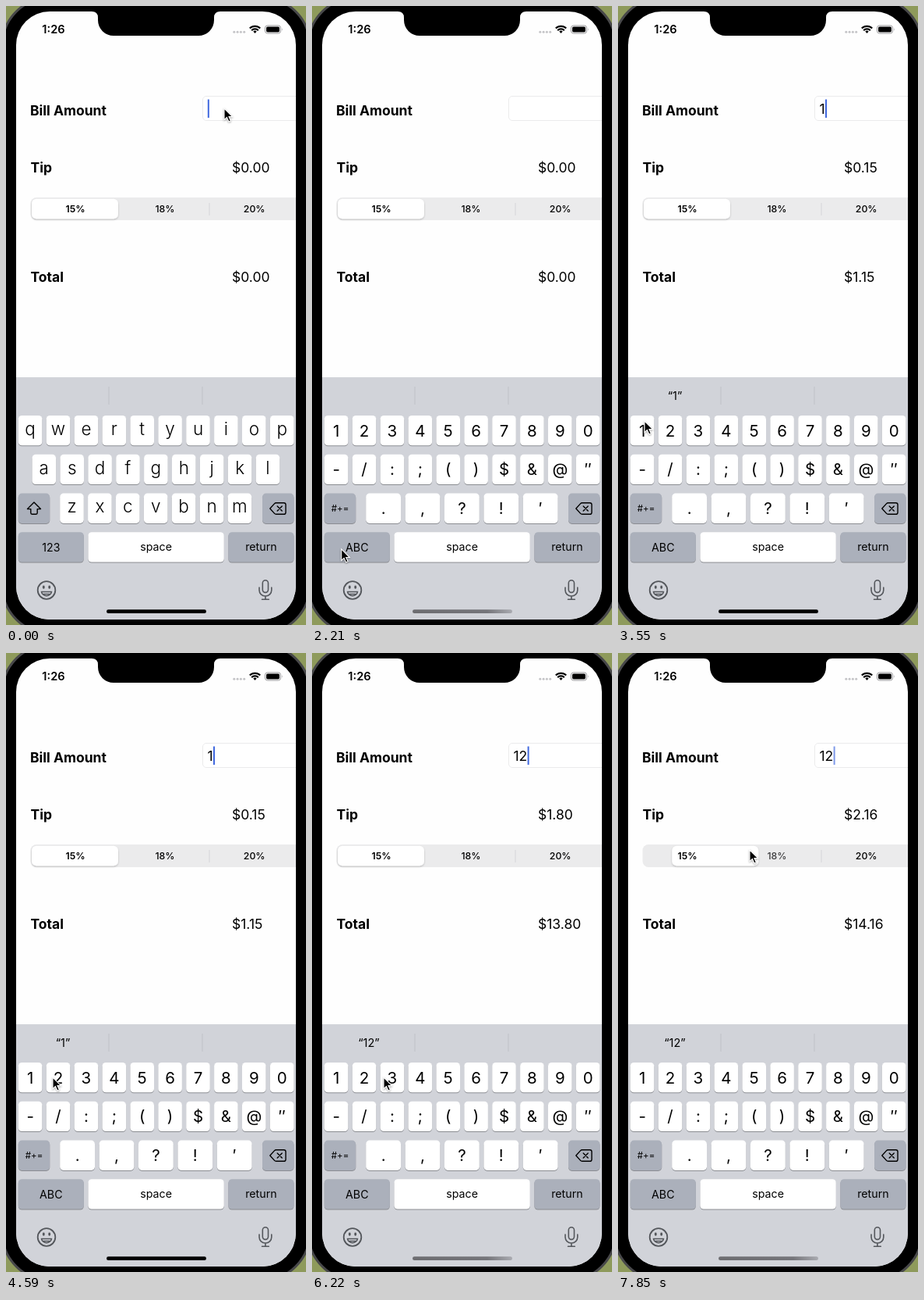
An HTML page for the animation above (8000 ms loop, 385 by 792 pixels).

```html
<!DOCTYPE html>
<html lang="en">
<head>
<meta charset="utf-8">
<title>Tip calculator</title>
<style>
  html, body { margin: 0; width: 100%; height: 100%; overflow: hidden; background: #8e9a5b; }
  svg { display: block; width: 385px; height: 792px; }
  text { font-family: Inter, Roboto, sans-serif; white-space: pre; }
  .label { font-size: 17.5px; font-weight: 700; }
  .value { font-size: 17.5px; }
  .mid { text-anchor: middle; }
  .seg { font-size: 12.3px; font-weight: 500; }
  .letter { font-size: 22.5px; font-weight: 350; }
  .digit { font-size: 20.5px; }
  .word { font-size: 14.2px; }
  .small { font-size: 11.5px; }
  .hint { font-size: 14.5px; }
  .big { font-size: 32px; }
  .line { fill: none; stroke-linecap: round; stroke-linejoin: round; }
</style>
</head>
<body>
<svg viewBox="0 0 385 792">
  <defs>
    <clipPath id="screen"><rect x="13" y="7" width="359" height="778" rx="43"/></clipPath>
    <linearGradient id="barFade">
      <stop offset="0" stop-color="#6d6d71"/>
      <stop offset=".75" stop-color="#75757a"/>
      <stop offset="1" stop-color="#a9aab0"/>
    </linearGradient>
    <filter id="soft" x="-20%" y="-20%" width="140%" height="160%">
      <feDropShadow dx="0" dy="1.2" stdDeviation="1.3" flood-opacity=".22"/>
    </filter>
  </defs>

  <rect width="385" height="792" fill="#8e9a5b"/>
  <rect x="-5" y="-11" width="395" height="814" rx="62" stroke="#48484a" stroke-width="3"/>
  <g clip-path="url(#screen)">
    <rect x="13" y="7" width="359" height="778" fill="#fefefe"/>

    <text class="label" x="31" y="139.5">Bill Amount</text>
    <text class="label" x="31.5" y="213.3">Tip</text>
    <text class="label" x="31.5" y="353.3">Total</text>
    <text class="value" id="tip" x="290" y="213.3"></text>
    <text class="value" id="total" x="290" y="353.3"></text>

    <rect x="252.5" y="115.5" width="140" height="31" rx="4.5" fill="#fff" stroke="#ebebec"/>
    <text class="value" id="amount" x="258.5" y="138"></text>
    <rect id="caret" y="119.5" width="2" height="23.5" fill="#4169df"/>

    <rect x="31.5" y="245" width="380" height="29" rx="7.5" fill="#ebebec"/>
    <rect x="260.5" y="252" width="1" height="16" fill="#d5d5d8"/>
    <rect id="thumb" y="246.7" width="111" height="25.6" rx="6" fill="#fff" filter="url(#soft)"/>
    <text class="seg mid" x="89" y="264" style="font-weight:600">15%</text>
    <text class="seg mid" id="second" x="204" y="264">18%</text>
    <text class="seg mid" x="318.7" y="264">20%</text>

    <rect x="13" y="475" width="359" height="310" fill="#d1d3d9"/>
    <path d="M132 487V510M252 487V510" stroke="#bfc1c7"/>
    <text class="hint mid" id="hint" x="73" y="504"></text>
    <g id="common"></g>
    <g id="letters"></g>
    <g id="digits"></g>

    <g class="line" stroke="#54575c" stroke-width="1.8">
      <circle cx="52" cy="747.5" r="11.3"/>
      <path d="M45.5 749.5H58.5A6.6 6.3 0 0 1 45.5 749.5ZM47 752.5H57" stroke-width="1.5"/>
      <path d="M48.3 743V744.3M55.7 743V744.3" stroke-width="2.8"/>
      <rect x="329.3" y="734.8" width="7.2" height="15.6" rx="3.6" stroke-width="1.6"/>
      <path d="M325 744V747.5A7.9 7.5 0 0 0 340.8 747.5V744M332.9 755V759.2M328.5 759.2H337.3" stroke-width="1.6"/>
    </g>
    <rect id="bar" x="129" y="772.3" width="128" height="4.8" rx="2.4"/>
    <g id="popup" filter="url(#soft)"><path fill="#fff"/><text class="big mid" y="505"></text></g>
  </g>

  <path d="M110 6H275V7Q267 7 267 15V18A20 20 0 0 1 247 38H138A20 20 0 0 1 118 18V15Q118 7 110 7Z"/>
  <text class="mid" x="61" y="35" font-size="14.6" font-weight="600">1:26</text>
  <g fill="#c4c4c7">
    <circle cx="292.8" cy="33.3" r="1.5"/><circle cx="297.1" cy="33.3" r="1.5"/>
    <circle cx="301.4" cy="33.3" r="1.5"/><circle cx="305.7" cy="33.3" r="1.5"/>
  </g>
  <g class="line" stroke="#000" stroke-width="2.2" style="stroke-linecap:butt">
    <path d="M312.8 28.6A9.4 9.4 0 0 1 326.2 28.6M315.2 31.2A6 6 0 0 1 323.8 31.2"/>
    <path d="M317.3 32.6A3 3 0 0 1 321.7 32.6L319.5 35Z" fill="#000" stroke="none"/>
  </g>
  <rect x="332.5" y="25" width="20" height="10" rx="3" fill="none" stroke="#98989b"/>
  <rect x="334" y="26.5" width="17" height="7" rx="1.7"/>
  <path d="M354 28.3Q355.4 30 354 31.7Z" fill="#98989b"/>

  <path id="cursor" d="M0 0V14.6L3.4 11.5L5.9 17L8.4 15.9L6 10.6H10.6Z" stroke="#fff" stroke-width="1.1"
        style="filter:drop-shadow(0 1px 1px rgba(0,0,0,.35))"/>
</svg>
<script>
const $ = id => document.getElementById(id);
const WHITE = '#fff', GRAY = '#abb0bb', PITCH = 35.9, KEY_W = 30.6, KEY_H = 38.3;
const ROWS = [524, 573.8, 623.6, 673.2];

function key(x, row, w, fill = WHITE, label = '', cls = 'word', drop = 23.6) {
  const y = ROWS[row], box = `x="${x}" width="${w}" height="${KEY_H}" rx="4.6"`;
  return `<rect ${box} y="${y + 1}" fill="#8b8d92"/><rect ${box} y="${y}" fill="${fill}"/>` +
    `<text class="${cls} mid" x="${x + w / 2}" y="${y + drop}">${label}</text>`;
}

const keyRow = (chars, x, row, cls, drop, pitch = PITCH, w = KEY_W) => [...chars]
  .map((c, i) => key(x + i * pitch, row, w, WHITE, c === '&' ? '&amp;' : c, cls, drop)).join('');

$('common').innerHTML =
  key(329, 2, 40.4, GRAY) + key(105.4, 3, 174.4, WHITE, 'space') + key(285.4, 3, 84, GRAY, 'return') +
  `<g class="line" stroke="#000" stroke-width="1.4">
    <path d="M338.8 643L344.6 636.6Q345.4 635.7 346.6 635.7H356.6Q359 635.7 359 638.1V647.9Q359 650.3 356.6 650.3H346.6Q345.4 650.3 344.6 649.4Z"/>
    <path d="M348.2 640L354.2 646M354.2 640L348.2 646"/></g>`;

$('letters').innerHTML =
  keyRow('qwertyuiop', 15.8, 0, 'letter', 24.8) + keyRow('asdfghjkl', 33.5, 1, 'letter', 24.8) +
  keyRow('zxcvbnm', 69.2, 2, 'letter', 24.8) + key(15.8, 2, 40.4, GRAY) +
  key(15.8, 3, 84, GRAY, '123', 'word', 24.4) +
  '<path class="line" d="M36 635L27.5 643.6H31.8V648.6Q31.8 650.2 33.4 650.2H38.6Q40.2 650.2 40.2 648.6V643.6H44.5Z" stroke="#000" stroke-width="1.4"/>';

$('digits').innerHTML =
  keyRow('1234567890', 15.8, 0, 'digit', 27) + keyRow('-/:;()$&@″', 15.8, 1, 'digit', 26.5) +
  keyRow('.,?!′', 69.2, 2, 'digit', 26.5, 50.4, 44.8) +
  key(15.8, 2, 40.4, GRAY, '#+=', 'small', 23.6) + key(15.8, 3, 84, GRAY, 'ABC', 'word', 25.2);

const LOOP = 8000, STEP = 148;
const SWITCH = 1915, TYPE_1 = 3550, TYPE_2 = 5175, SELECT = 7840;

// time, x, y of the pointer tip
const PATH = [
  [888, 280, 131], [1628, 38, 708], [2072, 38, 708], [2960, 34, 531],
  [4144, 34, 531], [4588, 60, 543], [5772, 60, 543], [6216, 92, 543],
  [6364, 92, 543], [7104, 123, 286], [7548, 169, 252]
];

function pointer(t) {
  const i = PATH.findIndex(p => p[0] > t);
  if (i === 0) return PATH[0].slice(1);
  if (i < 0) return PATH[PATH.length - 1].slice(1);
  const [t0, x0, y0] = PATH[i - 1], [t1, x1, y1] = PATH[i];
  const u = (t - t0) / (t1 - t0), e = u * u * (3 - 2 * u);
  return [x0 + (x1 - x0) * e, y0 + (y1 - y0) * e];
}

// Typing restarts the blink: hidden, a short fade in, then solid.
function caretAlpha(t) {
  const start = t < TYPE_1 ? 290 : t < TYPE_2 ? 3990 : 5620;
  if (t < start) return 1;
  const phase = (t - start) % 955;
  return Math.min(1, Math.max(0, (phase - 250) / 95));
}

function popup(t) {
  const down = at => t >= at - 300 && t < at;
  const digit = down(TYPE_1) ? 1 : down(TYPE_2) ? 2 : 0;
  $('popup').style.display = digit ? '' : 'none';
  if (!digit) return;
  const x = 15.8 + (digit - 1) * PITCH, r = x + KEY_W;
  const left = digit === 1 ? x : x - 12, right = r + 12;
  const [shape, text] = $('popup').children;
  shape.setAttribute('d', `M${left + 8} 466H${right - 8}Q${right} 466 ${right} 474V506` +
    `C${right} 518 ${r} 516 ${r} 530V558Q${r} 562 ${r - 4} 562H${x + 4}Q${x} 562 ${x} 558V530` +
    `C${x} 516 ${left} 518 ${left} 506V474Q${left} 466 ${left + 8} 466Z`);
  text.setAttribute('x', (left + right) / 2);
  text.textContent = digit;
}

function draw(now) {
  const t = Math.floor(((now % LOOP) + 12) / STEP) * STEP;
  const amount = t < TYPE_1 ? '' : t < TYPE_2 ? '1' : '12';
  const picked = t >= SELECT;
  const tip = amount * (picked ? .18 : .15);

  $('amount').textContent = amount;
  $('tip').textContent = '$' + tip.toFixed(2);
  $('total').textContent = '$' + (+amount + tip).toFixed(2);
  $('hint').textContent = amount && `“${amount}”`;
  $('caret').setAttribute('x', [258.8, 266, 276.6][amount.length]);
  $('caret').style.opacity = caretAlpha(t);
  $('thumb').setAttribute('x', picked ? 69.3 : 33);
  $('second').setAttribute('fill', picked ? '#3c3c3e' : '#000');

  const numeric = t >= SWITCH;
  $('letters').style.display = numeric ? 'none' : '';
  $('digits').style.display = numeric ? '' : 'none';
  const dim = numeric && t < TYPE_1 || t >= TYPE_2;
  $('bar').setAttribute('fill', dim ? 'url(#barFade)' : '#000');
  popup(t);
  $('cursor').setAttribute('transform', `translate(${pointer(t)})`);
}

const begin = performance.now();
function tick() {
  draw(performance.now() - begin);
  requestAnimationFrame(tick);
}
tick();
</script>
</body>
</html>
```
